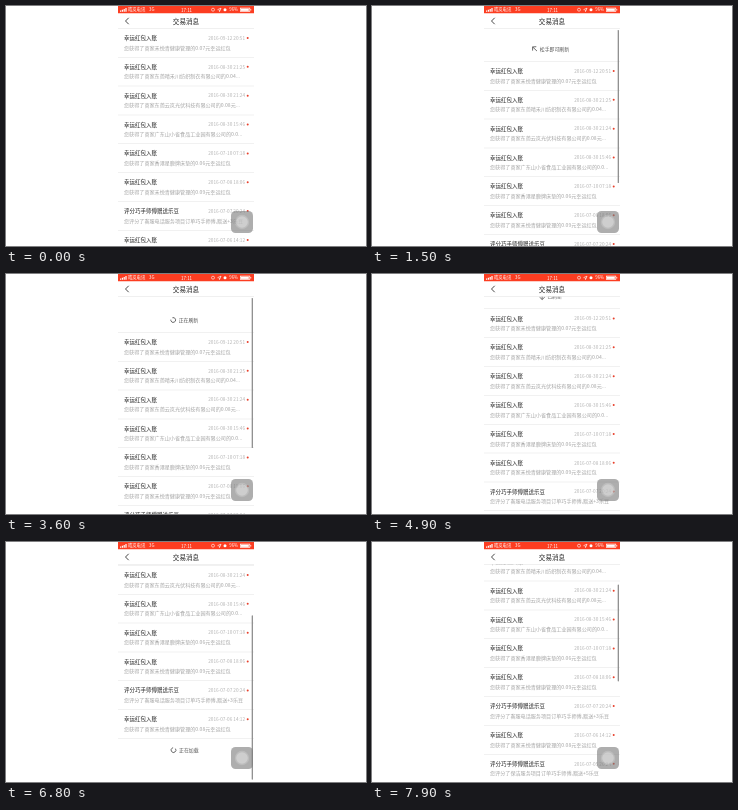
These frames come from a looping animation (360x240 px, 8 s). An HTML page with a canvas:

```html
<!DOCTYPE html>
<html lang="zh-CN">
<head>
<meta charset="utf-8">
<title>交易消息</title>
<style>
html, body { margin: 0; width: 100%; height: 100%; overflow: hidden; background: #fff; }
canvas { display: block; }
</style>
</head>
<body>
<canvas id="stage" width="360" height="240"></canvas>
<script>
const ctx = document.getElementById('stage').getContext('2d');
const FONT = '"Noto Sans CJK SC", "Noto Sans CJK", "Noto Sans", sans-serif';
const LOOP = 8000, LEFT = 112, RIGHT = 248, TOP = 22.5, ROW = 28.85;
const RED = '#fc3d21';

const lucky = (shop, rest) => ['幸运红包入账', `您获得了商家${shop}的${rest}`];
const rated = (job, coins) =>
  ['评分巧手师傅赠送乐豆', `您评分了${job}服务项目订单巧手师傅,赠送+${coins}乐豆`];
const rows = [
  ['09-12 20:51', ...lucky('禾悦青健康管理', '0.07元幸运红包')],
  ['08-30 21:25', ...lucky('东莞晴禾川纺织制衣有限公司', '0.04...')],
  ['08-30 21:24', ...lucky('东莞云岚光伏科技有限公司', '0.08元...')],
  ['08-30 15:46', ...lucky('广东山小雀食品工业园有限公司', '0.0...')],
  ['07-10 07:18', ...lucky('香港星鹿牌床垫', '0.06元幸运红包')],
  ['07-08 18:06', ...lucky('禾悦青健康管理', '0.09元幸运红包')],
  ['07-07 20:24', ...rated('客服电话', 3)],
  ['07-06 14:12', ...lucky('禾悦青健康管理', '0.08元幸运红包')],
  ['07-05 20:24', ...rated('保洁', 5)],
];

// [time, value] pairs
const scrollKeys = [[800, 0], [1000, 8], [1500, 33], [1800, 42], [2200, 47], [3400, 47]];
const flickKeys = [[6300, 0], [6400, -7], [6600, -36], [6800, -56.7], [7000, -59],
  [7200, -56], [7500, -45], [7900, -41], [8000, -40]];
const barKeys = [[800, 0], [900, 1], [3900, 1], [4300, 0], [6300, 0], [6400, 1]];

const clamp = v => Math.max(0, Math.min(1, v));
const smooth = v => (v = clamp(v), v * v * (3 - 2 * v));

function along(keys, t) {
  const i = keys.findIndex(k => k[0] > t);
  if (i < 0) return keys[keys.length - 1][1];
  if (!i) return keys[0][1];
  const [t0, a] = keys[i - 1], [t1, b] = keys[i];
  return a + (b - a) * (t - t0) / (t1 - t0);
}

function scrollAt(t) {
  if (t < 3400) return along(scrollKeys, t);
  if (t < 4700) return 47 - 22 * smooth((t - 3400) / 400);
  if (t < 6300) return 25 * (1 - smooth((t - 4700) / 400));
  return along(flickKeys, t);
}

function text(str, x, y, size, color, align = 'left', weight = 400) {
  ctx.font = `${weight} ${size}px ${FONT}`;
  ctx.fillStyle = color;
  ctx.textAlign = align;
  ctx.textBaseline = 'middle';
  ctx.fillText(str, x, y);
}

function box(x, y, w, h, color, r = 0) {
  ctx.fillStyle = color;
  ctx.beginPath();
  ctx.roundRect(x, y, w, h, r);
  ctx.fill();
}

function disc(x, y, r, color) {
  ctx.fillStyle = color;
  ctx.beginPath();
  ctx.arc(x, y, r, 0, 7);
  ctx.fill();
}

function line(points, color, width) {
  ctx.strokeStyle = color;
  ctx.lineWidth = width;
  ctx.beginPath();
  points.forEach(([x, y]) => ctx.lineTo(x, y));
  ctx.stroke();
}

function turned(x, y, angle, draw) {
  ctx.save();
  ctx.translate(x, y);
  ctx.rotate(angle);
  draw();
  ctx.restore();
}

function arrow(x, y, angle) {
  turned(x, y, angle, () => {
    line([[0, -3], [0, 3]], '#555', .8);
    line([[-2.7, .5], [0, 3], [2.7, .5]], '#555', .8);
  });
}

function spinner(x, y, t) {
  turned(x, y, t / 1000 * Math.PI * 2, () => {
    ctx.strokeStyle = '#555';
    ctx.lineWidth = .8;
    ctx.beginPath();
    ctx.arc(0, 0, 2.4, .6, 5.8);
    ctx.stroke();
  });
}

function pullHint(t, y) {
  const busy = t >= 3400 && t < 4600, done = t >= 4600;
  const armed = t >= 1300;
  const label = done ? '已刷新' : busy ? '正在刷新' : armed ? '松手即可刷新' : '下拉即可刷新';
  const x = 182.5 - label.length * 2.45;
  text(label, x, y, 4.9, '#555');
  if (busy) spinner(x - 5.5, y, t);
  else arrow(x - 5, y, done ? 0 : Math.PI * clamp((t - 1300) / 270));
}

function list(t, scroll) {
  const loaded = t >= 7500, count = loaded ? 9 : 8;
  const top = TOP + scroll;
  rows.slice(0, count).forEach(([date, title, note], i) => {
    const y = top + i * ROW;
    text(title, 118, y + 9.5, 5.5, '#222', 'left', 500);
    text('2016-' + date, 239, y + 9.5, 4.7, '#b5b5b5', 'right');
    disc(241.7, y + 9.5, 1, '#e8402c');
    text(note, 118, y + 19.2, 5.1, '#a6a6a6');
    box(LEFT, y + ROW - .4, 136, .5, '#e4e4e4');
  });
  if (scroll > 0) {
    pullHint(t, top - 12.5);
    box(LEFT, top - .4, 136, .5, '#e4e4e4');
  }
  if (!loaded) {
    const y = top + 8 * ROW + 11.5;
    text('正在加载', 173, y, 4.9, '#555');
    spinner(167.5, y, t);
  }
}

function scrollbar(t, scroll) {
  let y = 24, h = 186 - Math.max(0, scroll);
  if (t >= 7500) {
    h = 97;
    y += -scroll * .45;
  } else if (scroll < 0) {
    h -= Math.max(0, -scroll - 35);
    y = Math.min(24 - scroll * .87, 239 - h);
  }
  ctx.globalAlpha = along(barKeys, t);
  box(245.7, y, 1.2, h, '#858585', .6);
  ctx.globalAlpha = 1;
}

function header() {
  box(LEFT, 0, 136, TOP, '#fff');
  box(LEFT, TOP - .5, 136, .5, '#e2e2e2');
  box(LEFT, 0, 136, 7.3, RED);
  for (let i = 0; i < 4; i++) box(114 + i * 1.8, 4.5 - i * .8, 1.2, 1.2 + i * .8, '#fff');
  text('晴岚电讯', 122, 3.8, 4.3, '#fff');
  text('3G', 143, 3.8, 4.4, '#fff');
  text('17:11', 180.5, 3.8, 4.5, '#fff', 'center', 500);
  ctx.strokeStyle = '#fff';
  ctx.lineWidth = .6;
  ctx.beginPath();
  ctx.arc(207, 3.7, 1.5, 0, 7);
  ctx.stroke();
  line([[211.5, 3.7], [215, 2.2], [213.5, 5.5], [213.2, 4]], '#fff', .7);
  disc(219, 3.8, 1.5, '#fff');
  text('96%', 232, 3.8, 4.3, '#fff', 'right');
  ctx.strokeRect(234.4, 2.1, 9.4, 3.4);
  box(235, 2.7, 7.8, 2.2, '#fff');
  box(244.4, 3, .8, 1.6, '#fff');
  line([[122.7, 11.8], [119.5, 15], [122.7, 18.2]], '#333', .9);
  text('交易消息', 180, 15, 6.6, '#222', 'center', 500);
}

function touchButton() {
  box(225, 205, 22, 22, 'rgba(125,125,125,.62)', 4.5);
  disc(236, 216, 7.2, 'rgba(255,255,255,.18)');
  disc(236, 216, 5.8, 'rgba(255,255,255,.28)');
}

function draw(now) {
  const t = Math.floor(now % LOOP / 100) * 100;
  const scroll = scrollAt(t);
  ctx.fillStyle = '#fff';
  ctx.fillRect(0, 0, 360, 240);
  ctx.save();
  ctx.beginPath();
  ctx.rect(LEFT, 0, RIGHT - LEFT, 240);
  ctx.clip();
  list(t, scroll);
  scrollbar(t, scroll);
  header();
  touchButton();
  ctx.restore();
}

const start = performance.now();
function tick() {
  draw(performance.now() - start);
  requestAnimationFrame(tick);
}
tick();
</script>
</body>
</html>
```
